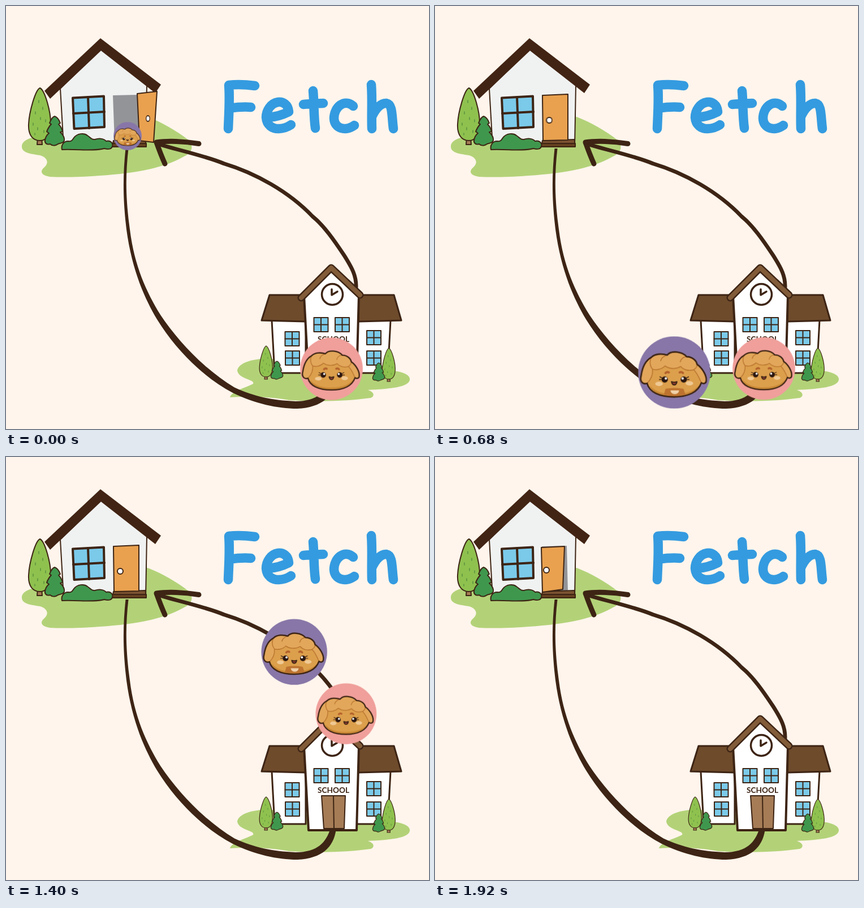
These frames come from a looping animation (748x748 px, 1960 ms). An HTML page without scripts:

```html
<!DOCTYPE html>
<html lang="en">
<head>
<meta charset="utf-8">
<title>Fetch</title>
<style>
html, body { margin: 0; width: 100%; height: 100%; overflow: hidden; background: #fff5ec; }
svg { display: block; width: 100%; height: 100%; }
.ink { stroke: #3d2414; stroke-width: 2; stroke-linejoin: round; stroke-linecap: round; }
.line { fill: none; stroke: #3d2414; stroke-linejoin: round; stroke-linecap: round; }
.glass { fill: #7bcaea; }
.sign { font: 700 13.6px Lato, "Open Sans", sans-serif; fill: #3d2414; text-anchor: middle; }

/* 49 ticks of 40 ms; each segment steps once per tick */
.parent, .child, .door, .knob { animation: 1960ms steps(3) infinite; }
.parent { animation-name: parent; }
.child { animation-name: child; }
.door { animation-name: door; }
.knob { animation-name: knob; }

@keyframes parent {
  0% { transform: translate(215px, 230px) scale(.375); animation-timing-function: steps(4); }
  8.16% { transform: translate(212px, 338px) scale(.94); animation-timing-function: steps(4); }
  16.32% { transform: translate(240px, 466px) scale(1); }
  22.44% { transform: translate(285px, 543px) scale(1); }
  28.57% { transform: translate(344px, 598px) scale(1); }
  34.69% { transform: translate(423px, 648px) scale(.96); }
  40.81% { transform: translate(511px, 652px) scale(.945); }
  46.93% { transform: translate(598px, 634px) scale(.925); animation-timing-function: steps(2); }
  51.02% { transform: translate(642.5px, 601px) scale(.912); animation-timing-function: steps(1); }
  53.06% { transform: translate(645px, 572px) scale(.908); animation-timing-function: steps(2); }
  57.14% { transform: translate(634px, 513px) scale(.9); }
  63.26% { transform: translate(591px, 433px) scale(.89); }
  69.38% { transform: translate(536px, 363px) scale(.88); }
  75.51% { transform: translate(457px, 308px) scale(.865); }
  81.63% { transform: translate(376px, 279px) scale(.853); animation-timing-function: steps(2); }
  85.71% { transform: translate(317px, 264px) scale(.84); }
  91.83% { transform: translate(232px, 236px) scale(.45); animation-timing-function: steps(2); }
  95.91%, 100% { transform: translate(215px, 230px) scale(0); }
}
@keyframes child {
  0% { transform: translate(575.5px, 641.5px) scale(.832); animation-timing-function: steps(8); }
  16.32% { transform: translate(578.5px, 641.5px) scale(.832); animation-timing-function: steps(9); }
  34.69% { transform: translate(581.5px, 641px) scale(.832); }
  40.81% { transform: translate(581px, 641px) scale(.832); animation-timing-function: steps(5); }
  51.02% { transform: translate(567.5px, 642px) rotate(8deg) scale(.832); }
  57.14% { transform: translate(590px, 639px) rotate(4deg) scale(.83); }
  63.26% { transform: translate(643.5px, 583.5px) scale(.825); }
  69.38% { transform: translate(618px, 482px) scale(.815); }
  75.51% { transform: translate(568px, 398px) scale(.8); }
  81.63% { transform: translate(485.5px, 326.5px) scale(.787); animation-timing-function: steps(2); }
  85.71% { transform: translate(419px, 293px) scale(.78); }
  91.83% { transform: translate(315px, 262px) scale(.68); animation-timing-function: steps(3); }
  97.95%, 100% { transform: translate(215px, 230px) scale(0); }
}
@keyframes door {
  0%, 4.08% { d: path("M267 151L232 155L236 238L261 241Z"); animation-timing-function: steps(4); }
  12.24%, 93.87% { d: path("M190 158L235 156L235 237L191 238Z"); animation-timing-function: steps(2); }
  97.95%, 100% { d: path("M188 160L229 158L226 234L190 239Z"); }
}
@keyframes knob {
  0%, 4.08% { transform: translate(251px, 199px) scale(.65, 1); animation-timing-function: steps(4); }
  12.24%, 93.87% { transform: translate(202px, 202px); animation-timing-function: steps(2); }
  97.95%, 100% { transform: translate(197px, 200px); }
}
</style>
</head>
<body>
<svg viewBox="0 0 748 748">
  <defs>
    <g id="tall" class="ink">
      <path d="M-4 88H3L4 100H-5Z" fill="#a67c56"/>
      <path d="M0 0C9 4 20 44 19 66C18 84 11 93 0 93C-12 93 -21 84 -20 64C-19 42 -8 3 0 0Z" fill="#8fc14f"/>
      <path d="M-2 22v4M5 34v4M-8 42v4M1 52v4M10 56v4M-12 62v4M-4 70v4M7 75v4M-9 80v3" stroke="#5d9440" stroke-width="1.6" fill="none"/>
    </g>
    <path id="pine" class="ink" fill="#3f974d" d="M0 0C4 1 8 7 10 12L7 14C11 18 13 22 14 27L10 28C14 32 18 38 17 43C15 48 10 47 6 49C1 53 -5 52 -8 49C-14 51 -18 47 -17 42C-16 37 -14 33 -10 30L-14 27C-12 22 -10 18 -6 14L-9 12C-7 7 -4 1 0 0Z"/>
    <g id="pane" class="ink">
      <rect width="25" height="25" class="glass"/>
      <path d="M12.5 0V25M0 12.5H25"/>
    </g>
    <g id="eye">
      <circle r="5.800" fill="#2b1710"/>
      <circle cx="2" cy="-2" r="2.2" fill="#fff"/>
      <path d="M-5 -3l-4 -2M-6 0h-4" class="line" stroke-width="1.4"/>
    </g>
    <path id="crust" d="M-50 20C-58 23 -64 16 -61 6C-59 -8 -53 -22 -42 -28C-35 -35 -22 -35 -13 -32C-6 -41 14 -39 23 -29C33 -29 41 -22 42 -15C52 -8 60 6 59 15C59 20 54 22 50 19C44 36 26 45 0 45C-28 45 -46 36 -50 20Z"/>
    <g id="pie">
      <use href="#crust" fill="#e2a75b"/>
      <path d="M-50 20C-43 13 -39 4 -40 -6C-34 -4 -24 -5 -17 -12C-10 -7 2 -5 12 -11C17 -5 26 -2 36 -5C43 2 46 10 50 19C44 36 26 45 0 45C-28 45 -46 36 -50 20Z" fill="#dc9f4c"/>
      <path d="M-45 24C-35 36 -20 40 0 40C22 40 38 34 47 22C42 36 26 44 0 44C-28 44 -42 36 -45 24Z" fill="#c98835"/>
      <path d="M-40 -6C-34 -4 -24 -5 -17 -12C-10 -7 2 -5 12 -11C17 -5 26 -2 36 -5C43 2 46 10 50 19M-13 -32C-20 -30 -24 -26 -25 -21M23 -29C16 -29 12 -24 11 -19M42 -15C43 -11 40 -8 36 -5M-42 -28C-46 -21 -45 -12 -40 -6C-39 4 -43 13 -50 20" fill="none" stroke="#b9742e" stroke-width="1.6"/>
      <use href="#crust" class="line" stroke-width="2.8"/>
      <ellipse cx="-28" cy="21" rx="7" ry="4" fill="#f0c993"/>
      <ellipse cx="28" cy="20" rx="7" ry="4" fill="#f0c993"/>
      <path d="M-16 1q3 -3 6 -1M10 0q3 -2 6 1" fill="none" stroke="#b4622c" stroke-width="4" stroke-linecap="round"/>
      <use href="#eye" x="-17.500" y="13"/>
      <use href="#eye" transform="translate(17.500 13) scale(-1 1)"/>
      <path d="M-5 17Q0 19 5 17Q4 23 0 23Q-4 23 -5 17Z" fill="#8c3b32" class="ink"/>
    </g>
  </defs>

  <rect width="748" height="748" fill="#fff5ec"/>
  <g fill="#b3d278">
    <path d="M28 247C30 234 52 229 95 225L250 196C270 203 300 219 324 238C333 250 328 260 313 267C275 288 225 296 165 300C125 303 98 303 78 302C62 300 59 292 68 285C76 278 74 268 60 264C40 261 27 259 28 247Z"/>
    <path d="M409 644C412 630 440 622 470 624L650 646C690 641 716 650 714 661C712 674 680 677 640 679C652 683 652 690 645 693C600 699 560 700 500 697C470 691 430 690 396 692C400 680 425 675 437 668C441 660 410 660 409 644Z"/>
  </g>

  <g id="home">
    <path d="M168 76L96 146L102 249H247L249 140Z" fill="#f0f2f1" class="ink"/>
    <path d="M167 57L274 139L264 154L168 79L78 164L68 150Z" fill="#422414"/>
    <path d="M118 162.500L173 159.500L174 214L120.500 217Z" class="ink glass" style="stroke-width:4"/>
    <path d="M145 161L147 216M119 190L174 187" class="line" stroke-width="4"/>
    <path d="M189 158L233 157L235 239H192Z" fill="#939498"/>
    <g class="ink">
      <path d="M190 238L247 236V243H189Z" fill="#7b5231"/>
      <path d="M188 243H248V249H188Z" fill="#65401f"/>
      <path class="door" d="M190 158L235 156L235 237L191 238Z" fill="#e9a14f"/>
      <circle class="knob" r="5" fill="#fff"/>
      <use href="#tall" x="60" y="145"/>
      <use href="#pine" x="86" y="195"/>
      <path d="M99 254C97 246 102 239 110 239C115 240 117 238 120 233C126 225 138 224 144 229C149 232 151 237 157 236C166 233 174 235 177 239C184 237 190 242 188 248C187 253 181 254 174 252C155 257 130 253 99 254Z" fill="#3f974d"/>
    </g>
  </g>

  <path d="M266 243C300 254 350 264 385 278.500C440 295 500 328 542 372C562 388 580 414 598 441C612 463 620 478 619 498" class="line" stroke-width="6.800"/>
  <path d="M341 243.500C315 239 285 238 266 241C271 255 276 268 281 279" class="line" stroke-width="9"/>

  <g id="school">
    <g class="ink" style="stroke-width:3">
      <path d="M470 556H530V649H475Z" fill="#fff"/>
      <path d="M622 556H680L675 649H620Z" fill="#fff"/>
      <path d="M466 511H530V558L452 556Z" fill="#6e4b2b"/>
      <path d="M622 511H686L699 556L623 558Z" fill="#6e4b2b"/>
      <path d="M527 512L575 467L624 512L620 660H535Z" fill="#fff" style="stroke-width:4"/>
    </g>
    <path d="M522 516L575 463L626 511" class="line" stroke-width="13"/>
    <path d="M522 516L575 463L626 511" class="line" style="stroke:#825c39;stroke-width:8"/>
    <circle cx="577" cy="510" r="18.500" fill="#fff" class="ink" style="stroke-width:3.500"/>
    <path d="M576 501V511L586 505" class="line" stroke-width="3.500"/>
    <use href="#pane" x="544.500" y="551"/>
    <use href="#pane" x="582" y="551"/>
    <use href="#pane" x="493.500" y="576"/>
    <use href="#pane" x="494" y="610"/>
    <use href="#pane" x="638" y="574"/>
    <use href="#pane" x="638" y="610"/>
    <text x="579" y="594" class="sign">SCHOOL</text>
    <path d="M558 599H600L598 657H562ZM579 599L580 657" fill="#a57c56" class="ink"/>
    <use href="#tall" transform="translate(460 601) scale(.59)"/>
    <use href="#pine" transform="translate(479 628) scale(.62)"/>
    <use href="#tall" transform="translate(677 605) scale(.59)"/>
    <use href="#pine" transform="translate(659 631) scale(.62)"/>
  </g>

  <path d="M211.500 252C206.500 300 206.500 340 213 395C223 470 247 520 267 554C302 611 352 658 401 684C440 703 480 712 515 712C560 710 579 689 583.500 660L573 659C566 680 552 699 512 699C470 697 440 691 404 674.500C349 641 303 591 273 546C248.500 506 227 460 219 395C211.500 340 211 300 216.500 252Z" fill="#3d2414"/>

  <g role="img" aria-label="Fetch" fill="none" stroke="#349be0" stroke-width="16.500" stroke-linecap="round" stroke-linejoin="round">
    <path d="M394 140C396 165 394 190 393 217M394 140C410 138 425 139 440 141M395 181C408 179 421 178 433 179"/>
    <path d="M464 197C478 196 490 192 500 187C499 174 490 169 481 170C468 172 460 185 460 197C461 211 471 217 482 217C491 217 498 214 504 210"/>
    <path d="M543 150C545 172 544 196 547 216M526 174C539 173 550 172 561 172"/>
    <path d="M614 177C598 163 580 179 580 199C581 217 600 222 616 211"/>
    <path d="M646 139C648 165 646 190 647 217M647 196C654 180 664 171 673 172C684 174 682 195 685 217"/>
  </g>

  <g class="parent">
    <circle r="66.500" fill="#8876a8"/>
    <use href="#pie"/>
    <path d="M-16 30Q0 27 17 30L21 41Q0 46 -19 41Z" fill="#bd732f"/>
    <path d="M-7 33H9Q8 40 1 40Q-6 40 -7 33Z" fill="#f0d0a8"/>
  </g>
  <g class="child">
    <circle r="66.500" fill="#f09f9b"/>
    <use href="#pie"/>
  </g>
</svg>
</body>
</html>
```
